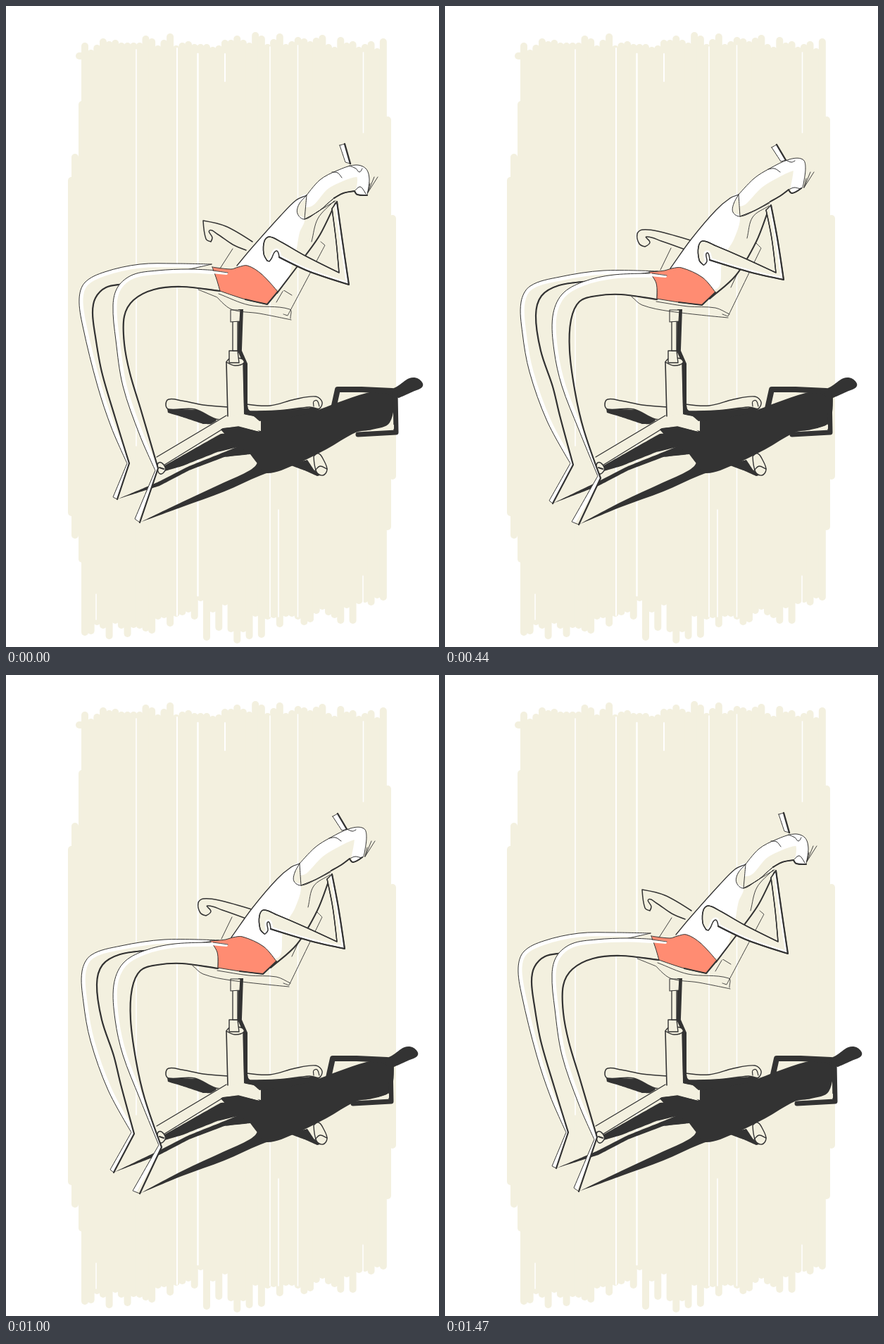
Write an HTML page with a canvas that moves like this. It is 615 by 911 pixels and loops after 1.68 s.

```html
<!DOCTYPE html>
<html lang="en">
<head>
<meta charset="utf-8">
<title>Office chair stretch</title>
<style>
  html, body { margin: 0; width: 100%; height: 100%; overflow: hidden; background: #fff; }
  canvas { display: block; width: 615px; height: 911px; }
</style>
</head>
<body>
<canvas id="stage"></canvas>
<script>
const W = 615, H = 911;
const PAPER = '#f3f0df', INK = '#333', WHITE = '#fff', CORAL = '#ff8c72';
const canvas = document.getElementById('stage');
const ctx = canvas.getContext('2d');
const dpr = window.devicePixelRatio || 1;
canvas.width = W * dpr;
canvas.height = H * dpr;

// Points are "x,y"; a trailing "!" marks a corner, a leading "!" makes all corners.
function parse(s) {
  const hard = s[0] === '!';
  return s.replace(/^!/, '').split(' ').map(t => {
    const [x, y] = t.split(',').map(parseFloat);
    return { x, y, corner: hard || t.endsWith('!') };
  });
}

function spline(s, closed) {
  const p = typeof s === 'string' ? parse(s) : s;
  const n = p.length, path = new Path2D();
  const at = i => closed ? p[(i + n) % n] : p[Math.max(0, Math.min(n - 1, i))];
  const handle = (i, len) => {
    if (at(i).corner) return [0, 0];
    const a = at(i - 1), b = at(i + 1);
    const dx = b.x - a.x, dy = b.y - a.y, k = len / 3 / (Math.hypot(dx, dy) || 1);
    return [dx * k, dy * k];
  };
  path.moveTo(p[0].x, p[0].y);
  for (let i = 0; i < (closed ? n : n - 1); i++) {
    const a = at(i), b = at(i + 1), len = Math.hypot(b.x - a.x, b.y - a.y);
    const [ax, ay] = handle(i, len), [bx, by] = handle(i + 1, len);
    path.bezierCurveTo(a.x + ax, a.y + ay, b.x - bx, b.y - by, b.x, b.y);
  }
  if (closed) path.closePath();
  return path;
}

function stroke(path, width = 1, color = INK) {
  ctx.lineWidth = width;
  ctx.strokeStyle = color;
  ctx.stroke(path);
}
const line = (s, width, color) => stroke(spline(s), width, color);

function shape(s, fill, width) {
  const path = spline(s, true);
  ctx.fillStyle = fill;
  ctx.fill(path);
  if (width) stroke(path, width);
  return path;
}

// Area between two edges, with a light band along the first one.
function limb(outer, inner, band, thin = 1, thick = 2.2) {
  const a = parse(outer), b = parse(inner);
  for (const e of [a, b]) e[0].corner = e[e.length - 1].corner = true;
  const area = spline([...a, ...b.reverse()], true);
  ctx.fillStyle = PAPER;
  ctx.fill(area);
  ctx.save();
  ctx.clip(area);
  line(outer, band, WHITE);
  ctx.restore();
  stroke(area, thin);
  line(inner, thick);
}

const TOPS = [52, 62, 55, 46, 50, 48, 52, 52, 52, 52, 42, 46, 56, 48, 39, 56, 52, 50, 54, 54, 54, 58, 56, 48, 48,
  42, 48, 52, 37, 42, 54, 47, 39, 54, 50, 44, 46, 50, 45, 41, 54, 58, 44, 52, 50, 58, 54, 50, 60, 46];
const ENDS = [895, 893, 880, 885, 900, 878, 885, 897, 884, 885, 889, 892, 872, 870, 882, 868, 866, 862, 872, 846, 902,
  862, 888, 852, 890, 906, 890, 900, 868, 898, 872, 870, 883, 868, 868, 872, 880, 876, 864, 858, 866, 870, 878, 856,
  878, 850, 848, 852, 842, 845];
const SIDES = ['108,140 108,786', '98,215 98,752', '93,248 93,720', '542,162 542,740', '549,302 549,668', '104,71 114,71'];
const GAPS = [['185,62 185,625', 1.6], ['243,60 243,866', 2], ['272.5,68 272.5,838', 2.4], ['311,68 311,107', 2],
  ['375,58 375,868', 1.6], ['387,716 387,868', 1.6], ['414.5,56 414.5,868', 1.6], ['507.5,66 507.5,180', 1.6],
  ['507,810 507,850', 1.5], ['128,836 128,872', 1.5]];

function backdrop() {
  ctx.fillStyle = WHITE;
  ctx.fillRect(0, 0, W, H);
  ctx.fillStyle = PAPER;
  ctx.fillRect(107, 72, 433, 766);
  TOPS.forEach((y, i) => {
    const x = 112 + i * 8.65;
    line(`${x},${y + 5} ${x},${ENDS[i] - 5}`, 10, PAPER);
  });
  SIDES.forEach(s => line(s, 10, PAPER));
  GAPS.forEach(([s, w]) => line(s, w, WHITE));
}

const POSES = [
  {
    dx: 0,
    farLeg: ['292,367 240,366 190,367 140,378 112,393 104,416 109,455 130,540 150,600 172,650! 152,698!',
      '168,395 142,400 127,415 123,436 127,470 136,520 155,585 175,650! 158,701!'],
    nearLeg: ['302,376 260,374 215,376 180,382 159,399 152,425 156,475 166,540 190,610 212,660! 183,729!',
      '304,405 250,399 210,403 181,418 168,441 168,480 176,522 191,572 216,657! 190,734!'],
    shorts: '293,371! 320,374 330,371 343,369 363,381 386,406! 371,424! 340,417 304,405! 299,388',
    side: '328,369 348,345 390,298 412,276 427,269',
    collar: '427,269 416,282 414,295 424,303 443,292 468,277',
    lit: '424,303 417,322 410,355 386,402',
    back: '468,280 446,325 425,355 385,408',
    hole: '466,277 443,302 434,335',
    neck: ['427,269 446,247 470,234 496,226 511,231 516,246 513,268!', '424,303! 445,291 466,273 479,266 495,263! 499,268 513,269!'],
    marks: ['463,236 471,237 477,244', '488,227 497,231 502,236 506,231', '495,263 502,257 506,259 511,267'],
    ear: '!474,198 481,196 489,224 482,222',
    whisk: [514, 265],
    arm: ['470,278! 478,335 487,396! 430,377 388,357! 384,348 377,359 374,363!',
      '463,288! 469,335 473,379! 425,355 390,335 374,328 367,334 366,352 371,362!'],
    farArm: '350,335! 312,313 280,305! 284,331 291,335! 293,329 289,319 300,324 322,339 341,347!',
    seat: ['273,403 300,414! 320,431 360,437 405,446!', '302,409 345,425 403,431 404,444'],
    frame: ['322,345 304,373', '!447,335 453,340 400,440 394,438', '388,400 406,411', '405,385 384,421']
  },
  {
    dx: -4,
    farLeg: ['294,371 235,370 172,374 127,387 107,409 105,437 112,490 125,533 146,592 173,650! 148,703!',
      '176,395 150,399 131,412 124,433 126,470 140,520 151,562 180,652! 155,706!'],
    nearLeg: ['300,379 240,377 192,385 161,403 149,434 155,488 166,540 190,610 214,664! 181,734!',
      '302,408 260,402 216,403 190,412 176,432 172,480 175,530 188,572 221,662! 192,738!'],
    shorts: '291,372! 312,373 323,370 341,368 366,380 385,407! 366,424! 332,418 302,408! 300,390',
    side: '320,370 350,334 385,295 408,273 423,268',
    collar: '423,268 411,280 409,290 417,298 438,292 464,279',
    lit: '417,298 409,325 400,360 386,396',
    back: '462,285 442,337 412,382 368,423',
    hole: '463,281 440,302 431,332',
    neck: ['423,268 440,248 462,233 489,223 508,222 514,233 511,266!', '417,298! 438,290 464,276 477,268 493,262! 499,268 512,265!'],
    marks: ['458,235 468,232 476,238', '488,223 495,229 500,235 508,228', '493,262 498,256 506,260'],
    ear: '!466,200 475,197 484,221 478,224',
    whisk: [513, 262],
    arm: ['465,279! 475,320 482,389! 455,382 381,355! 380,347 379,357 374,363!',
      '458,288! 466,330 470,379! 420,352 386,334 370,330 362,339 364,357 372,363!'],
    farArm: '350,332! 305,313 284,308 277,314 279,331 287,335! 293,331 289,323 304,327 343,347!',
    seat: ['275,408 292,424 330,429 402,443!', '302,414 345,426 402,431 402,443'],
    frame: ['312,341 299,371', '!446,334 451,336 397,441 389,439', '404,397 411,402', '384,418 411,386']
  },
  {
    dx: -7,
    farLeg: ['302,377 225,376 163,385 121,398 108,421 110,465 120,520 145,590 178,650! 148,703!',
      '204,391 162,397 137,412 129,440 136,490 153,541 163,582 182,652! 153,707!'],
    nearLeg: ['302,380 240,382 196,392 166,410 153,441 155,490 166,540 190,602 217,668! 180,733!',
      '301,417 250,410 215,412 191,420 179,446 177,490 185,550 197,602 221,671! 190,737!'],
    shorts: '290,378! 312,376 322,373 336,372 366,386 384,407! 365,425! 332,421 301,416! 300,394',
    side: '320,373 350,331 385,290 405,273 417,268',
    collar: '417,268 410,281 409,293 419,299 440,291 461,280',
    lit: '419,299 411,330 394,360 383,403',
    back: '460,288 442,335 413,383 376,416',
    hole: '460,284 437,300 429,330',
    neck: ['417,268 439,245 461,231 489,218 508,218 512,231 508,258!', '419,299! 441,290 462,278 476,270 488,261! 493,266 506,259!'],
    marks: ['459,232 468,231 476,236', '484,219 492,222 497,220', '488,261 496,258 505,260'],
    ear: '!464,201 471,197 484,219 477,221',
    whisk: [510, 258],
    arm: ['463,283! 472,330 481,389! 436,379 376,361! 372,351 372,363 368,368!',
      '456,290! 464,330 470,379! 420,356 385,341 366,334 360,342 361,361 367,368!'],
    farArm: '352,334! 302,320 280,318 273,324 276,338 284,342! 291,336 286,328 307,334 346,348!',
    seat: ['265,413 280,425 320,434 402,443!', '300,420 345,427 384,429 404,438'],
    frame: ['321,344 306,375', '!438,333 449,344 402,441 394,438', '380,400 388,404', '406,400 420,370']
  },
  {
    dx: -6,
    farLeg: ['290,383 222,381 163,390 117,406 101,434 104,480 115,530 145,600 179,655! 150,699!',
      '186,400 152,405 131,417 124,441 127,500 145,562 183,658! 157,704!'],
    nearLeg: ['300,382 237,386 192,395 164,414 152,450 155,500 175,562 215,670! 183,735!',
      '299,416 250,409 211,413 184,425 170,456 170,510 186,582 219,672! 195,739!'],
    shorts: '277,379! 302,381 316,374 331,373 360,386 379,410! 368,422! 332,420 299,416! 299,396',
    side: '316,374 350,329 385,286 404,270 417,265',
    collar: '417,265 405,278 403,289 412,296 438,288 459,275',
    lit: '412,296 410,325 392,358 379,405',
    back: '456,283 428,340 404,376 377,412',
    hole: '458,278 434,298 426,328',
    neck: ['417,265 434,241 455,222 478,210 495,208 505,220 502,258!', '412,296! 438,287 459,273 471,263 486,256! 490,261 503,257!'],
    marks: ['454,224 462,227 470,235', '474,211 483,221 493,219', '486,256 493,251 500,257'],
    ear: '!455,195 465,194 477,212 470,214',
    whisk: [504, 254],
    arm: ['461,276! 469,325 478,384! 445,377 375,352! 370,346 371,365 367,369!',
      '453,285! 463,330 467,375! 420,354 385,339 364,334 356,342 359,366 364,369!'],
    farArm: '350,337! 312,328 284,318 270,320 272,339 279,343! 289,337 285,329 308,335 344,348!',
    seat: ['268,415 284,427 308,437 402,441!', '299,421 345,426 384,428 404,438'],
    frame: ['312,346 299,376', '!436,330 446,332 401,439 393,437', '388,399 399,405', '380,415 418,372']
  }
];

const tip = s => s.split(' ').pop().replace('!', '');

function shadow(p) {
  shape(`!${tip(p.farLeg[1])} 215,677 260,654 310,634 345,620 370,630 347,637 310,641 260,660 218,682`, INK);
  shape(`${tip(p.nearLeg[1])}! 250,705 310,677 346,660 357,648 350,638! 400,625! 405,653! 362,667 310,690 250,712`, INK);
  shape('!222,662 222,655 305,608 330,606 350,622 300,634 250,654', INK);
  shape('303,600! 330,597 362,604! 362,588! 400,583 440,575 470,564 512,550 546,545 551,552 545,592 520,602 ' +
    '497,606 455,630 410,652 370,664 357,650 347,637! 318,616!', INK);
  ctx.save();
  ctx.translate(p.dx, 0);
  shape('533,550! 555,541 573,529 586,530 592,540 578,548 558,557!', INK);
  line('!465,572 471,545 505,545 548,547', 8);
  line('!553,550 554,606 500,609', 7);
  shape('!478,557 482,550 508,550', PAPER);
  shape('!534,601 551,595 551,601', PAPER);
  ctx.restore();
}

function base() {
  shape('!229,572 272,574 298,586 300,595 280,594 250,584 230,578', INK);
  shape('!343,575 385,574 432,571 448,571 438,578 400,585 360,590', INK);
  shape('!402,652 428,645 438,660 452,666 442,668 424,660', INK);
  shape('437,640! 444,636 451,645 456,659 450,667 441,662', PAPER, 1.4);
  line('439,660 446,654 456,658', 1.4);
  shape('342,566! 375,568 410,559 440,555 449,563 445,572 437,571 431,570 385,575 344,576!', PAPER, 1.4);
  line('437,569 437,562 442,561 445,569', 1.2);
  shape('316,570! 280,567 250,561 231,559 227,567 231,573 268,573 298,587 314,586!', PAPER, 1.5);
  shape('!298,590 313,580 337,580 360,605 330,598 308,600 222,652 215,641', PAPER);
  line('!313,582 298,591 214,641', 1.3);
  line('!222,654 308,601 330,598 360,606', 1.3);
  shape('217,649 224,652 226,660 219,665 215,657', PAPER, 1.5);
  line('218,656 224,658', 2);
  shape('!330,431 337,431 335,490 343,508 343,572 356,584 337,580 337,508 329,490', INK);
  shape('!314,506 337,506 338,580 314,583', PAPER);
  line('313,506 314,545 315,583', 1.6);
  line('337,506 338,545 339,578', 1.6);
  shape('313,506! 318,501 334,501 338,507 325,511', PAPER, 1.4);
  shape('!317,490 329,490 331,507 317,507', PAPER, 1.4);
  shape('!322,448 329,448 329,490 322,490', PAPER, 1.3);
  shape('!319,432 333,432 332,448 319,449', PAPER, 1.1);
}

function seat(p) {
  p.seat.forEach(s => line(s, .9));
  p.frame.forEach(s => line(s, .9));
  shape(p.farArm, PAPER);
  line(p.farArm, 1.5);
}

function body(p) {
  const side = parse(p.side), back = parse(p.back);
  side[0].corner = true;
  ctx.fillStyle = PAPER;
  ctx.fill(spline([...side, ...back], true));
  const rim = parse(p.collar).slice(1, 4), lit = parse(p.lit).slice(1);
  ctx.fillStyle = WHITE;
  ctx.fill(spline([...side, ...rim, ...lit], true));
  line(p.side, 1.3);
  line(p.back, 2);
  line(p.hole, .9);
  shape(p.shorts, CORAL, 1);
  const [, , , , , a, b, c] = p.shorts.split(' ');
  line(`${a} ${b} ${c}`, 2);
  const hip = parse(p.nearLeg[0])[0];
  line(`${hip.x - 10},${hip.y + 2} ${hip.x + 11},${hip.y + 4}`, 4, WHITE);
  line(`${hip.x - 8},${hip.y} ${hip.x + 13},${hip.y + 3}`, .9);
}

function head(p) {
  limb(p.neck[0], p.neck[1], 34, 1, .9);
  line(p.collar, 1);
  const throat = p.neck[1].split(' ').slice(2).join(' ');
  line(throat, 2);
  p.marks.forEach(s => line(s, 1));
  shape(p.ear, WHITE, 1);
  const e = p.ear.slice(1).split(' ');
  line(`${e[1]} ${e[2]}`, 2.4);
  const [x, y] = p.whisk;
  [[14, -22], [9, -22], [3, -13]].forEach(([dx, dy]) => line(`${x},${y} ${x + dx},${y + dy}`, .9));
}

function draw(p) {
  ctx.setTransform(dpr, 0, 0, dpr, 0, 0);
  ctx.lineCap = ctx.lineJoin = 'round';
  backdrop();
  shadow(p);
  base();
  seat(p);
  limb(...p.farLeg, 11);
  limb(...p.nearLeg, 11);
  body(p);
  head(p);
  limb(...p.arm, 7, 1.5, 1.3);
  line(p.arm[0].split(' ').slice(0, 5).join(' '), 2.2);
}

const LOOP = 1680;
const STEPS = [[360, 0], [440, 1], [520, 2], [1000, 3], [1080, 2], [1160, 1], [LOOP, 0]];
const start = performance.now();
let shown = -1;

function tick() {
  const t = (performance.now() - start) % LOOP;
  const pose = STEPS.find(([end]) => t < end)[1];
  if (pose !== shown) draw(POSES[shown = pose]);
  requestAnimationFrame(tick);
}
tick();
</script>
</body>
</html>
```
